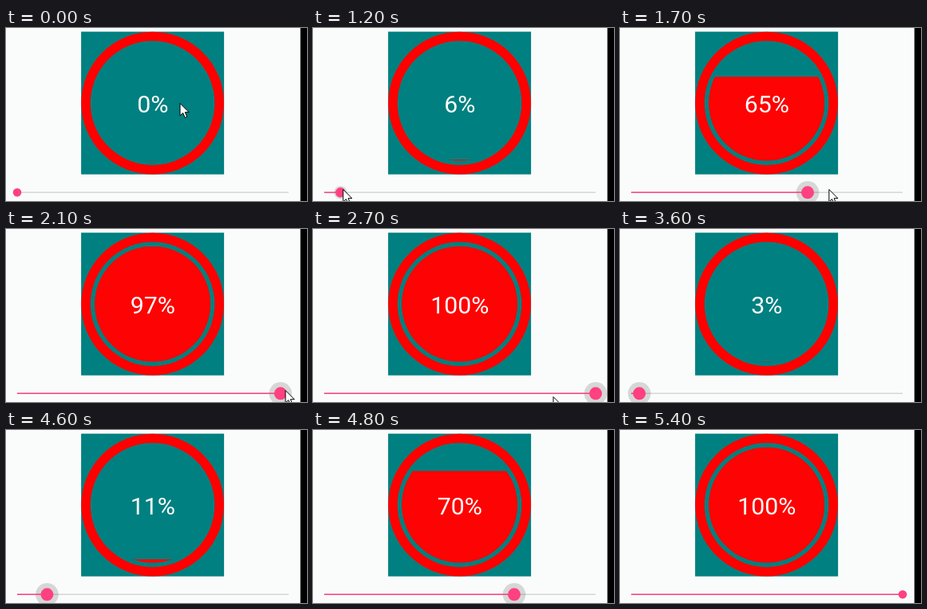
Animation of 377x217 px, one loop 5.8 s. Source, as an HTML page:

```html
<!DOCTYPE html>
<html lang="en">
<head>
<meta charset="utf-8">
<title>Circle fill slider</title>
<style>
  html, body { margin: 0; width: 100%; height: 100%; overflow: hidden; background: #fafbfb; }
  svg { display: block; width: 100vw; height: 100vh; }
  text { font: 30.3px Roboto, sans-serif; fill: #fff; text-anchor: middle; }
</style>
</head>
<body>
<svg viewBox="0 0 377 217">
  <clipPath id="disc"><circle cx="183.6" cy="94.1" r="72.5"/></clipPath>
  <rect width="377" height="217" fill="#fafbfb"/>
  <rect x="368.7" width="9" height="217" fill="#000"/>
  <rect x="94.1" y="4.6" width="179" height="179" fill="#008080"/>
  <circle cx="183.6" cy="94.1" r="83.6" fill="none" stroke="#f00" stroke-width="11.6"/>
  <g clip-path="url(#disc)"><rect id="level" x="94" width="180" height="180" fill="#fd0303"/></g>
  <text id="label" x="183.8" y="106"></text>
  <path d="M14 206.3H354" stroke="#d6d6d6" stroke-width="1.5"/>
  <circle id="halo" cy="206.3" fill="#000" fill-opacity=".14"/>
  <path id="progress" stroke="#ff4081" stroke-width="1.5"/>
  <circle id="thumb" cy="206.3" fill="#ff4081"/>
  <path id="cursor" d="M0 .5V16L3.7 12.6L6.2 18.5L8.7 17.4L6.3 11.7H11.2Z" fill="#fff" stroke="#000"/>
</svg>
<script>
const DURATION = 5800, STEP = 100;

const $ = id => document.getElementById(id);
const set = (id, attrs) => {
  for (const name in attrs) $(id).setAttribute(name, attrs[name]);
};

const ramp = (time, from, to) => Math.min(1, Math.max(0, (time - from) / (to - from)));

// S-shaped ease from 0 to 1; a bias above 1 passes the middle earlier.
function ease(time, from, to, bias = 1) {
  const part = ramp(time, from, to);
  const done = bias * part ** 1.8;
  return done / (done + (1 - part) ** 1.8);
}

function draw(time) {
  const move = (from, to, bias) => ease(time, from, to, bias);

  // Drag up, drag back, let it slip to zero, drag up again.
  const percent = Math.round(
    100 * move(1000, 2300, 1.4) - 97 * move(2700, 3600, 3.2)
    - 3 * move(4000, 4200) + 100 * move(4500, 5100, 2.3));
  const press = ramp(time, 1100, 1400) - ramp(time, 5200, 5400);

  // The pointer runs ahead of the thumb and leaves below the stage.
  const x = 218 - 179 * move(0, 300) - 31 * move(400, 700)
    + 350 * move(1000, 2300, 2) - 114 * move(2600, 2800) + 121 * move(4500, 5000);
  const y = 94 + 94 * move(0, 300) + 19 * move(400, 700) - 5 * move(1000, 1200)
    + 16 * move(2600, 2800) - 12 * move(5000, 5100) + 20 * move(5200, 5300);

  const thumbX = 14 + 3.4 * percent;

  // The liquid line is the chord of an arc that opens from the bottom.
  set('level', { y: 94.1 + 72.5 * Math.cos(Math.PI * percent / 100) });
  $('label').textContent = percent + '%';
  set('progress', { d: `M14 206.3H${thumbX}` });
  set('thumb', { cx: thumbX, r: 5.3 + 2.7 * press });
  set('halo', { cx: thumbX, r: press && 5 + 9.3 * press });
  set('cursor', { transform: `translate(${x} ${y})` });
}

const start = performance.now();
function tick() {
  const time = (performance.now() - start) % DURATION;
  draw(Math.floor(time / STEP) * STEP);
  requestAnimationFrame(tick);
}
tick();
</script>
</body>
</html>
```
